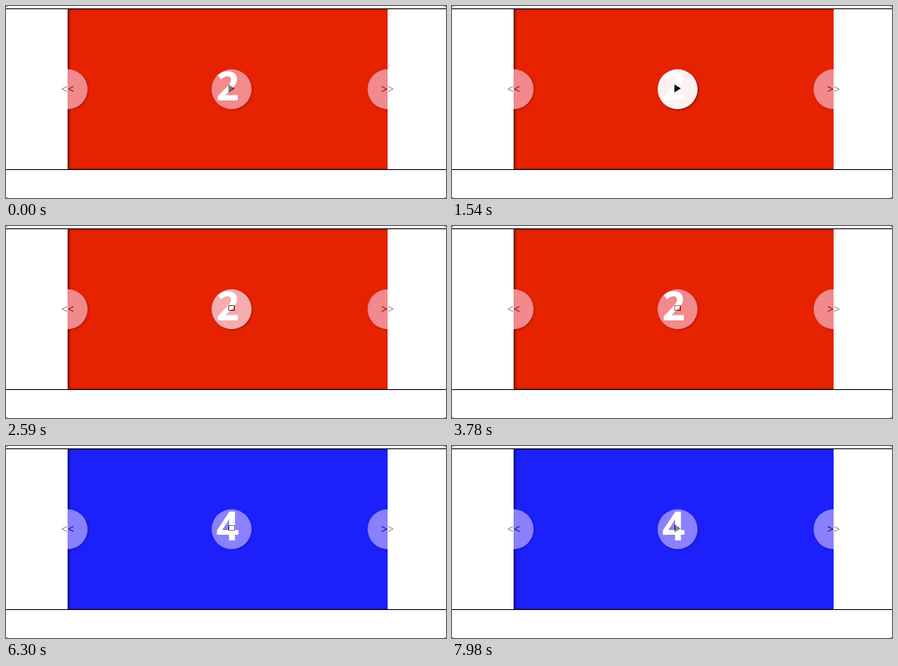
Recreate the animation shown at these times as an HTML page. Size 550x240 px, loop 8000 ms.

```html
<!DOCTYPE html>
<html lang="en">
<head>
<meta charset="utf-8">
<title>Slider</title>
<style>
  html, body { margin: 0; width: 100%; height: 100%; overflow: hidden; background: #fff; }
  #stage { position: relative; width: 550px; height: 240px; overflow: hidden; }
  #slide { position: absolute; left: 77px; top: 4px; width: 400px; height: 200px; }
  #slide.deep { box-shadow: inset 2px 0 3px rgba(0, 0, 0, .55); }
  svg { position: absolute; left: 0; top: 0; }
  text { font-family: "Open Sans", "Noto Sans", sans-serif; text-anchor: middle; }
  #digit { font-size: 50px; font-weight: 700; fill: #fff; }
  .label { font-size: 14px; }
  .disc { fill: #fff; }
  .deep .disc { filter: drop-shadow(1px 1px 1px rgba(0, 0, 0, .55)); }
</style>
</head>
<body>
<div id="stage">
  <div id="slide"></div>
  <svg id="ui" width="550" height="240" viewBox="0 0 550 240">
    <clipPath id="frame"><rect x="77" y="4" width="400" height="200"/></clipPath>
    <g id="pads" clip-path="url(#frame)">
      <circle cx="77" cy="104" r="25"/>
      <circle cx="282" cy="104" r="25"/>
      <circle cx="477" cy="104" r="25"/>
    </g>
    <text id="digit" x="277" y="118"></text>
    <g opacity=".5">
      <g clip-path="url(#frame)">
        <circle class="disc" cx="77" cy="104" r="25"/>
        <circle class="disc" cx="477" cy="104" r="25"/>
      </g>
      <text class="label" x="77" y="109">&lt;&lt;</text>
      <text class="label" x="477" y="109">&gt;&gt;</text>
    </g>
    <g id="toggle">
      <circle class="disc" cx="282" cy="104" r="25"/>
      <path id="play" d="M278 98L286 103L278 108Z"/>
      <rect id="stop" x="278.5" y="99.5" width="7" height="6" fill="none" stroke="#000"/>
    </g>
    <path d="M0 3h550v1H0zM0 204h550v1H0z"/>
    <path fill="#999" d="M0 0h2v1H0zM548 0h2v1h-2zM0 239h2v1H0zM548 239h2v1h-2z"/>
  </svg>
</div>
<script>
const LOOP = 8000, STEP = 70;
const $ = id => document.getElementById(id);

const slides = [
  { from: 0, digit: "2", color: "#e62200", pad: "#e5151d", deep: true },
  { from: 4270, digit: "3", color: "#faeacf", pad: "#faeacf", deep: false },
  { from: 6300, digit: "4", color: "#1c20fa", pad: "#1503fd", deep: true }
];

// Hover fades of the middle button
const easeOut = p => 1 - (1 - p) ** 2;
const easeInOut = p => p * p * (3 - 2 * p);
const fades = [
  { start: 980, time: 850, from: .5, to: 1, ease: easeOut },
  { start: 2340, time: 390, from: 1, to: .5, ease: easeInOut },
  { start: 6800, time: 350, from: .5, to: 1, ease: easeOut },
  { start: 7590, time: 390, from: 1, to: .5, ease: easeInOut }
];

function opacityAt(t) {
  const fade = fades.filter(f => t >= f.start).pop();
  if (!fade) return .5;
  const p = Math.min(1, (t - fade.start) / fade.time);
  return fade.from + (fade.to - fade.from) * fade.ease(p);
}

function draw(t) {
  const slide = slides.filter(s => t >= s.from).pop();
  const playing = t >= 2100 && t < 7420;
  $("slide").style.background = slide.color;
  $("slide").classList.toggle("deep", slide.deep);
  $("ui").classList.toggle("deep", slide.deep);
  $("pads").setAttribute("fill", slide.pad);
  $("digit").textContent = slide.digit;
  $("toggle").setAttribute("opacity", opacityAt(t));
  $("play").style.display = playing ? "none" : "";
  $("stop").style.display = playing ? "" : "none";
}

const begin = performance.now();
function tick() {
  const t = (performance.now() - begin) % LOOP;
  draw(Math.floor(t / STEP) * STEP);
  requestAnimationFrame(tick);
}
tick();
</script>
</body>
</html>
```
